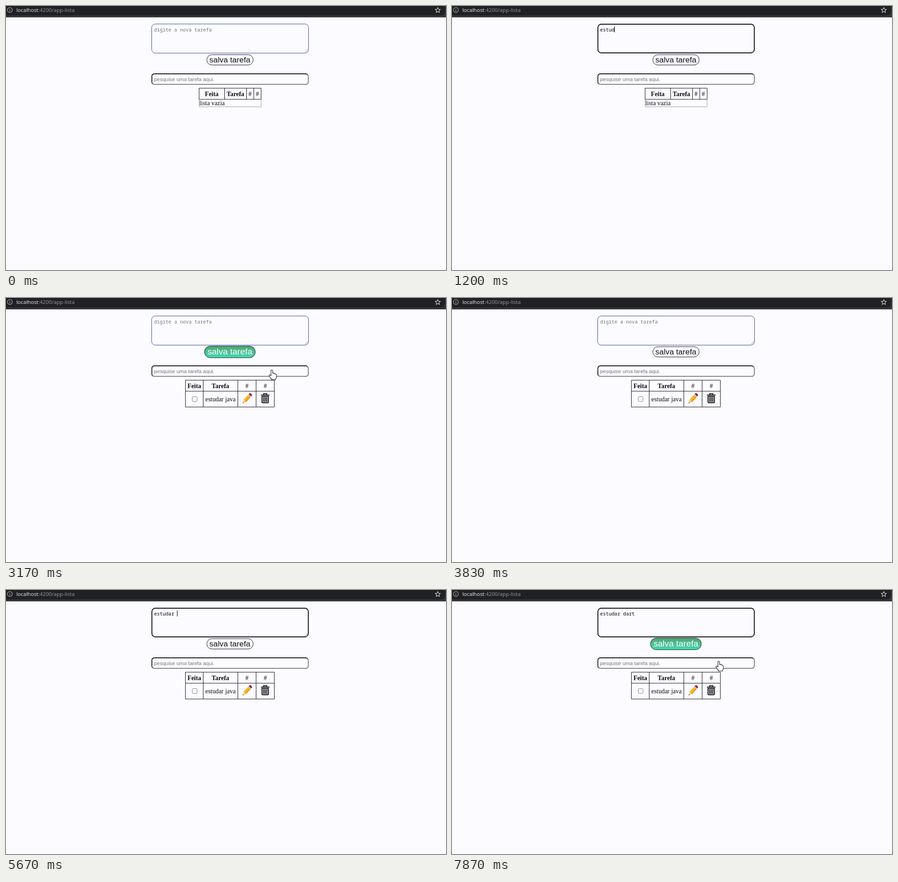
Write an HTML page that moves like this. It is 965 px wide and 580 px high and loops after 8 s.

```html
<!DOCTYPE html>
<html lang="pt">
<head>
<meta charset="utf-8">
<title>Lista de tarefas</title>
<style>
  html, body { margin: 0; width: 100%; height: 100%; overflow: hidden; background: #fcfbff; }
  svg { display: block; width: 100vw; height: 100vh; }
  text { white-space: pre; }
  .url { font: 11.52px "Open Sans", "Noto Sans", sans-serif; fill: #9a9ca0; }
  .mono { font: 10.56px "Noto Sans Mono", "DejaVu Sans Mono", monospace; }
  .sans { font: 11.5px "Liberation Sans", Arial, sans-serif; fill: #77747c; }
  .button { font: 17.4px "Liberation Sans", Arial, sans-serif; text-anchor: middle; }
  .serif { font: 13.82px "Liberation Serif", "Times New Roman", serif; fill: #0c0a12; }
  .middle { text-anchor: middle; }
  .bold { font-weight: bold; }
  .grid { fill: none; stroke: #0c0a12; }
</style>
</head>
<body>
<svg viewBox="0 0 965 580">
  <defs>
    <linearGradient id="green" x2="0" y2="1">
      <stop offset="0" stop-color="#4fa671"/>
      <stop offset="1" stop-color="#45d9b4"/>
    </linearGradient>
  </defs>

  <!-- Address bar -->
  <rect width="965" height="25" fill="#35363a"/>
  <path d="M0 0H963V11Q963 21 953 21H0Z" fill="#202124"/>
  <g fill="none" stroke="#b4b6ba" stroke-width="1.1">
    <circle cx="8.5" cy="8.7" r="5.4"/>
    <path d="M8.5 7.8V11.8M8.5 5.4V6.7"/>
    <path stroke="#d8d9dc" stroke-linejoin="round" d="M947 3.2L948.6 7.1L952.8 7.4L949.6 10.1L950.6 14.2L947 12L943.4 14.2L944.4 10.1L941.2 7.4L945.4 7.1Z"/>
  </g>
  <text class="url" x="22.7" y="13"><tspan fill="#f0f1f3">localhost</tspan>:4200/app-lista</text>

  <!-- New task -->
  <rect id="area" fill="none"/>
  <path d="M655.5 102L662.5 95M659.5 102L662.5 99" stroke="#77747c" stroke-width=".9"/>
  <text id="typed" class="mono" x="324.7" y="55.5"></text>
  <path id="caret" stroke="#000"/>

  <g id="button">
    <rect id="pill"/>
    <text id="label" class="button" x="491" y="124">salva tarefa</text>
  </g>

  <!-- Search -->
  <g fill="none" stroke-width="1.8">
    <path stroke="#76737c" d="M661 150.5Q663 152.5 663 155V166Q663 172.2 657 172.2H326Q323 172.2 321 170.5"/>
    <path stroke="#1a1722" d="M321 170.5Q319.9 169 319.9 166V155Q319.9 149 326 149H657Q659.5 149 661 150.5"/>
  </g>
  <text class="sans" x="324.7" y="164.5">pesquise uma tarefa aqui.</text>

  <g id="emptyTable">
    <path class="grid" style="stroke:#a09ea6" d="M423.5 205V221.5H559.5V205"/>
    <path class="grid" d="M423.5 180.5H559.5V205H423.5ZM479.5 180.5V205M527.5 180.5V205M543.5 180.5V205"/>
    <g class="serif middle">
      <text class="bold" x="451.2" y="197.5">Feita</text>
      <text class="bold" x="503.3" y="197.5">Tarefa</text>
      <text x="535.3" y="197.5">#</text>
      <text x="551.3" y="197.5">#</text>
    </g>
    <text class="serif" x="424" y="217.5">lista vazia</text>
  </g>

  <g id="fullTable">
    <path class="grid" d="M393.5 180.5H588.5V239.5H393.5ZM393.5 204.8H588.5M432.5 180.5V239.5M508.5 180.5V239.5M548.5 180.5V239.5"/>
    <g class="serif middle">
      <text class="bold" x="413" y="197.5">Feita</text>
      <text class="bold" x="470.3" y="197.5">Tarefa</text>
      <text x="528.5" y="197.5">#</text>
      <text x="568.7" y="197.5">#</text>
      <text x="470.5" y="227">estudar java</text>
    </g>
    <rect x="408.5" y="216.7" width="10.4" height="10.6" rx="2" fill="#fff" stroke="#767676"/>
    <!-- Pencil, drawn upright and tilted -->
    <g transform="translate(519 231.5) rotate(42)">
      <path fill="#f3cf9c" d="M0 0L-3.7 -7H3.7Z"/>
      <path fill="#3a3036" d="M0 0L-1.2 -2.3H1.2Z"/>
      <path fill="#fbb424" d="M-3.7 -7H3.7V-22H-3.7Z"/>
      <path fill="#ea9a1c" d="M1.2 -7H3.7V-22H1.2Z"/>
      <path fill="#c9c3c6" d="M-3.7 -22H3.7V-24H-3.7Z"/>
      <path fill="#8e2036" d="M-3.7 -24H3.7V-26Q3.7 -28 1.7 -28H-1.7Q-3.7 -28 -3.7 -26Z"/>
    </g>
    <g fill="none" stroke="#211d27" stroke-width="2">
      <path d="M559 213.3H578M565 212.5V210.3H572V212.5"/>
      <path fill="#b9b6be" d="M561.4 216H575.6V228Q575.6 230.3 573.3 230.3H563.7Q561.4 230.3 561.4 228Z"/>
      <path stroke-width="1.6" d="M565.3 218V228M568.5 218V228M571.7 218V228"/>
    </g>
  </g>

  <path id="hand" fill="#fff" stroke="#111" stroke-width="1.1" stroke-linejoin="round"
    d="M-1.8 1.6Q-1.8 0 0 0T1.8 1.6V7.2Q4.6 6.2 5.2 8Q7.6 7.4 8 9.2Q10.2 9 10.2 11.4V15Q10.2 17.5 8.6 19.5V21.5H-.6V20Q-3.4 17.5 -5.6 13.4Q-6.6 11.2 -5 10.8Q-3.6 10.6 -1.8 13Z"/>
</svg>

<script>
  const LOOP = 8000, CHAR = 6.336;
  const [area, typed, caret, pill, label, emptyTable, fullTable, hand] =
    ["area", "typed", "caret", "pill", "label", "emptyTable", "fullTable", "hand"]
      .map(id => document.getElementById(id));

  const SAVE = 2930;
  const tasks = [
    { text: "estudar java", focus: 500, end: SAVE,
      keys: [870, 970, 1070, 1130, 1200, 1330, 1530, 1570, 1630, 1700, 1770, 1830] },
    { text: "estudar dart", focus: 4130, end: LOOP,
      keys: [4330, 4470, 4930, 5070, 5200, 5300, 5430, 5670, 6600, 6700, 6830, 7000] }
  ];
  const caretOff = [[2470, SAVE], [6130, 6600], [7530, LOOP]];
  // Hand pointer while it hovers over the button: [time, x, y]
  const visits = [
    [[2670, 548, 134], [2830, 583, 158], [3200, 583, 158], [3430, 548, 136]],
    [[7670, 548, 134], [7870, 585, 156.5], [LOOP, 585, 156.5]]
  ];

  const set = (el, attrs) => { for (const k in attrs) el.setAttribute(k, attrs[k]); };
  const show = (el, on) => set(el, { visibility: on ? "visible" : "hidden" });
  const within = (t, [from, to]) => t >= from && t < to;
  const box = (el, left, top, right, bottom, attrs) =>
    set(el, { x: left, y: top, width: right - left, height: bottom - top, ...attrs });

  function pointer(t) {
    const path = visits.find(v => within(t, [v[0][0], v.at(-1)[0]]));
    if (!path) return null;
    const i = path.findIndex(p => p[0] > t), a = path[i - 1], b = path[i];
    const u = (t - a[0]) / (b[0] - a[0]), k = u * (2 - u);
    return [a[1] + (b[1] - a[1]) * k, a[2] + (b[2] - a[2]) * k];
  }

  function draw(t) {
    const task = tasks.find(s => within(t, [s.focus, s.end]));
    const count = task ? task.keys.filter(k => k <= t).length : 0;
    typed.textContent = count ? task.text.slice(0, count) : "digite a nova tarefa";
    set(typed, { fill: count ? "#08060e" : "#77747c" });

    if (task) box(area, 320, 40, 663, 103, { rx: 7.5, stroke: "#100d1c", "stroke-width": 1.9 });
    else box(area, 319.5, 39.5, 663.5, 103.5, { rx: 8, stroke: "#34479a", "stroke-width": 1 });

    const x = Math.round(324.7 + count * CHAR) + .5;
    set(caret, { d: `M${x} 45V58` });
    show(caret, task && !caretOff.some(span => within(t, span)));

    const at = pointer(t);
    if (at) box(pill, 435.3, 105.7, 546.7, 131.2, { rx: 12.5, fill: "url(#green)", stroke: "#14201c" });
    else box(pill, 440.5, 107, 542, 129.6, { rx: 11, fill: "#fcfbff", stroke: "#100d1c" });
    set(label, { fill: at ? "#fff" : "#100d1c", style: `font-size:${at ? 19 : 17.4}px` });
    show(hand, at);
    if (at) set(hand, { transform: `translate(${at})` });

    show(emptyTable, t < SAVE);
    show(fullTable, t >= SAVE);
  }

  const start = performance.now();
  function tick() {
    draw((performance.now() - start) % LOOP);
    requestAnimationFrame(tick);
  }
  tick();
</script>
</body>
</html>
```
